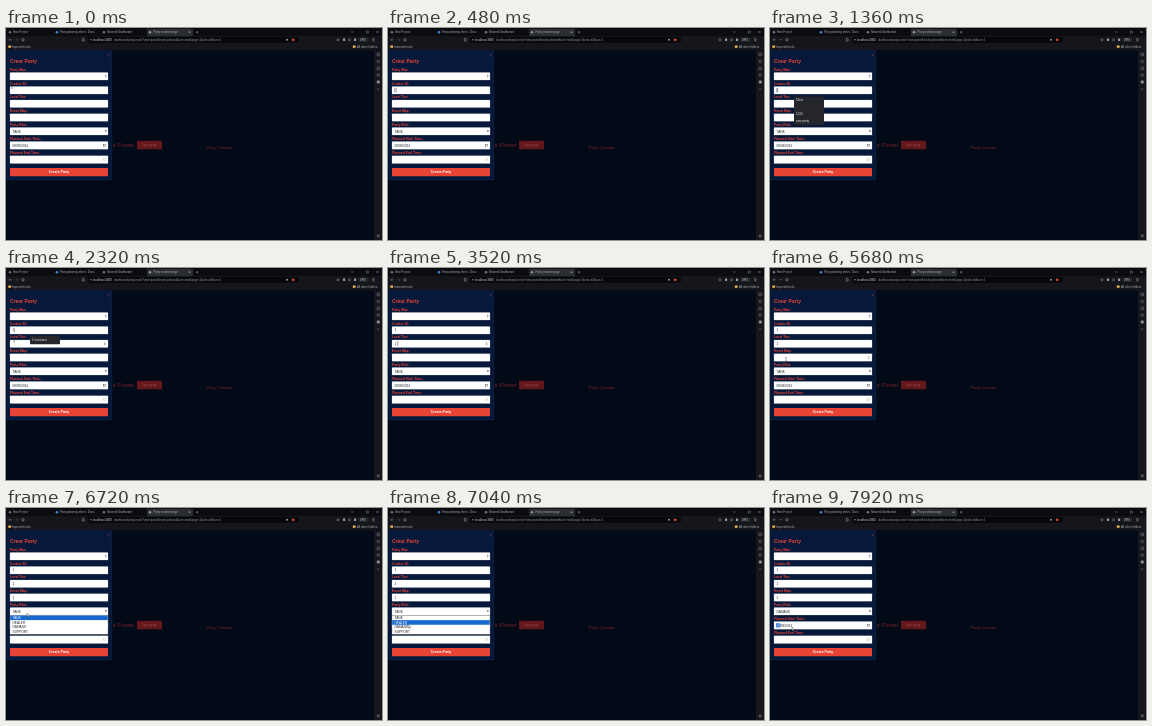
An HTML page for the animation above (8000 ms loop, 376 px wide and 212 px high).

```html
<!DOCTYPE html>
<html lang="en">
<head>
<meta charset="utf-8">
<title>Party form</title>
<style>
html, body { margin: 0; width: 100%; height: 100%; overflow: hidden; background: #020916; }
svg { display: block; width: 100vw; height: 100vh; }
text { font-family: "Liberation Sans", Arial, sans-serif; }
</style>
</head>
<body>
<svg id="stage" viewBox="0 0 376 212"></svg>
<script>
const LOOP = 8000;
const stage = document.getElementById('stage');

function add(tag, attrs, parent = stage) {
  const el = document.createElementNS('http://www.w3.org/2000/svg', tag);
  for (const k in attrs) el.setAttribute(k, attrs[k]);
  parent.appendChild(el);
  return el;
}
const group = () => add('g', {});
const box = (x, y, width, height, fill, rx = 0, p = stage) =>
  add('rect', { x, y, width, height, fill, rx }, p);
const dot = (cx, cy, r, fill, p = stage) => add('circle', { cx, cy, r, fill }, p);
const line = (d, stroke, w = 0.5, p = stage) =>
  add('path', { d, stroke, 'stroke-width': w, fill: 'none' }, p);
function label(x, y, str, size, fill, p = stage, weight = 400) {
  const el = add('text', { x, y, fill, 'font-size': size, 'font-weight': weight }, p);
  el.textContent = str;
  return el;
}
const cross = (x, y, r, color) =>
  line(`M${x - r} ${y - r}l${2 * r} ${2 * r}m0 ${-2 * r}l${-2 * r} ${2 * r}`, color);
const show = (el, on) => el.setAttribute('visibility', on ? 'visible' : 'hidden');

const RED = '#e94335', GREY = '#9a9ca2', INK = '#25272c', BLUE = '#1769cf';

function drawBrowser() {
  box(0, 0, 376, 22.5, '#0b0c10');
  box(0, 8, 376, 14.5, '#14161b');
  box(141, 0.8, 46, 7.2, '#2a2d34', 1);
  [[4, 7, 'New Project', '#70737b'], [51, 54, 'Party planning sheet - Docs', '#4b82d8'],
   [98, 101, 'Network Dashboard', '#70737b'], [144, 147.5, 'Party creation page', '#8f9299']]
    .forEach(([ix, x, str, color]) => {
      dot(ix, 4.2, 1.3, color);
      label(x, 5.3, str, 2.8, '#a7a9af');
    });
  cross(183.5, 4.2, 0.8, '#d0d1d5');
  line('M190 4.2h2.4m-1.2-1.2v2.4', GREY);
  line('M345 4h2.4', GREY);
  add('rect', { x: 360.5, y: 3, width: 2, height: 2, fill: 'none', stroke: GREY, 'stroke-width': 0.4 });
  cross(371.5, 4, 1, GREY);

  line('M6 11.8h-3m1.2-1.2l-1.2 1.2 1.2 1.2', '#85878d');
  line('M9 11.8h3m-1.2-1.2l1.2 1.2-1.2 1.2', '#55575d');
  add('circle', { cx: 17, cy: 11.8, r: 1.2, fill: 'none', stroke: '#b5b7bb', 'stroke-width': 0.5 });
  line('M76.3 10.3h1.8v3l-.9-.8-.9.8z', GREY);
  box(82, 9, 211, 5.7, '#07080b', 2);
  dot(85, 11.8, 0.8, '#8c8e94');
  label(87.2, 12.9, 'localhost:3000', 2.9, '#d7d8dc');
  label(108, 12.9, '/dashboard/party/create?view=panel&mode=planned&sort=start&page=1&role=all&size=5', 2.7, '#92949b');
  dot(281, 11.8, 1, '#93959d');
  dot(287.2, 11.8, 1.4, '#d94632');
  [332, 338, 343.5, 349].forEach((x, i) => i % 2
    ? box(x - 1, 10.6, 2.2, 2.4, '#9b9da3', 0.4)
    : add('circle', { cx: x, cy: 11.8, r: 1.1, fill: 'none', stroke: GREY, 'stroke-width': 0.5 }));
  box(352.8, 9.7, 9.8, 4.2, '#24262d', 1);
  label(354, 12.8, 'VPN', 2.7, '#c0c2c7');
  line('M366 10.7h2.7m-2.7 1.1h2.7m-2.7 1.1h2.7', '#b5b7bb', 0.4);

  box(2.3, 17.4, 2.8, 2.3, '#efbd54', 0.3);
  label(6.3, 19.6, 'Imported tools', 2.9, '#aaacb1');
  box(346.8, 17.4, 2.8, 2.3, '#efbd54', 0.3);
  label(351, 19.6, 'All other folders', 2.9, '#aaacb1');

  box(367.8, 22.5, 8.2, 189.5, '#15171d');
  [26.5, 33.5, 40.5, 47, 54, 61].forEach((y, i) => {
    if (i === 5) return line(`M371 ${y}h2.4`, '#85878c');
    add('rect', { x: 371, y: y - 1.2, width: 2.5, height: 2.4, rx: i % 2 ? 1.2 : 0.4,
      fill: i === 4 ? '#8b8d93' : 'none', stroke: '#92949a', 'stroke-width': 0.5 });
  });
  add('circle', { cx: 372.3, cy: 207.8, r: 1.1, fill: 'none', stroke: GREY, 'stroke-width': 0.6 });
}

function drawPage() {
  box(0, 22.5, 367.8, 189.5, '#020a18');
  label(106.5, 119.2, 'e Finder', 6, '#701f25');
  box(131, 112.8, 25, 8.4, '#65181c', 0.7);
  label(136, 118.1, 'Join party', 3.3, '#9c4b48');
  label(200.5, 120.7, 'Party Creador', 4.2, '#82222a');
}

const FIELDS = [
  ['Party Max:', 44.5], ['Creator ID:', 58.5], ['Level Tier:', 72], ['Event Map:', 85.7],
  ['Party Role:', 99.5], ['Planned Start Time:', 113.6], ['Planned End Time:', 127.8]
];

function drawForm() {
  box(0, 22.5, 106, 129.5, '#07193a');
  line('M0 22.7H105.8V151.8H0', '#132b52', 0.4);
  label(4, 35.1, 'Crear Party', 5, RED, stage, 700);
  cross(102.6, 27.3, 0.9, '#a34349');
  FIELDS.forEach(([name, y]) => {
    label(4, y - 1.8, name, 3.3, RED, stage, 700);
    add('rect', { x: 4, y, width: 98, height: 7.6, rx: 0.5, fill: '#fff',
      stroke: '#c9ccd2', 'stroke-width': 0.25 });
  });
  add('path', { d: 'M98.8 102.6h2.2l-1.1 1.4z', fill: INK });
  label(6.5, 118.6, '08/09/2024', 3.1, INK);
  [117.4, 131.6].forEach((y, i) => add('rect', { x: 97.2, y: y - 1, width: 2, height: 2,
    fill: 'none', stroke: i ? '#b4b6ba' : '#333', 'stroke-width': 0.4 }));
  box(4, 140, 98, 8.2, RED, 0.6);
  label(53, 145.3, 'Create Party', 3.5, '#fff', stage, 700).setAttribute('text-anchor', 'middle');
}

function spinner(x, y) {
  const g = group();
  add('path', { d: `M${x} ${y - 0.4}l.9-1.1.9 1.1zm0 .8l.9 1.1.9-1.1z`, fill: '#66696f' }, g);
  return g;
}

function popup(y, h, rows) {
  const g = group();
  box(24, y, 30, h, '#24262b', 0.7, g);
  rows.forEach(([dy, str]) => label(26, y + dy, str, 3, '#e4e5e8', g));
  return g;
}

drawBrowser();
drawPage();
drawForm();

const idText = label(6.5, 63.4, '1', 3.1, INK);
const tierText = label(6.5, 76.9, '1', 3.1, INK);
const mapText = label(6.5, 90.6, '1', 3.1, INK);
const roleText = label(6.5, 104.5, 'TANK', 3.2, INK);
const caret = box(6.1, 60, 0.35, 4, '#222');
spinner(98.8, 48.3);
const tierSpin = spinner(97.7, 75.8);
const mapSpin = spinner(97.7, 89.5);

const dateMark = group();
box(6, 115.4, 4.4, 4, BLUE, 0, dateMark);
label(6.5, 118.6, '08', 3.1, '#fff', dateMark);

const longList = popup(68.5, 28.5, [[4.8, 'Clear'], [18.5, '1234'], [25.2, 'new party']]);
const shortList = popup(67.7, 8.5, [[5.3, '1 manzana']]);

const ROLES = ['TANK', 'HEALER', 'DAMAGE', 'SUPPORT'];
const menu = group();
add('rect', { x: 4, y: 107.2, width: 98, height: 19, fill: '#fff', stroke: '#777', 'stroke-width': 0.35 }, menu);
const menuMark = box(4.2, 107.5, 97.6, 4.6, BLUE, 0, menu);
const options = ROLES.map((str, i) => label(6.5, 110.9 + i * 4.65, str, 3.2, INK, menu));

const arrow = add('path', { d: 'M0 0V3.5l.8-.7.6 1.2.6-.3-.6-1.2H2.5z',
  fill: '#fff', stroke: '#111', 'stroke-width': 0.35 });
const beam = line('M-.6-1.8h1.2M0-1.8V1.8M-.6 1.8h1.2', '#222', 0.4);

// time, x, y
const PATH = [
  [0, 6, 58.5], [450, 8, 62], [1650, 7.5, 62], [2250, 8, 71.8], [2700, 9.5, 75.5],
  [4250, 10, 75.6], [4950, 15, 89], [5500, 16, 91.3], [6000, 16, 91.3],
  [6500, 21, 104.5], [6800, 21, 105.2], [7120, 20, 118.5], [7320, 20, 118.5],
  [7600, 22, 119], [8000, 22, 119]
];

function pointer(t) {
  let i = 0;
  while (i < PATH.length - 2 && t >= PATH[i + 1][0]) i++;
  const [t0, x0, y0] = PATH[i], [t1, x1, y1] = PATH[i + 1];
  const u = (t - t0) / (t1 - t0), e = u * u * (3 - 2 * u);
  return [x0 + (x1 - x0) * e, y0 + (y1 - y0) * e];
}

function render(t) {
  const [x, y] = pointer(t);
  const within = i => y >= FIELDS[i][1] && y <= FIELDS[i][1] + 7.6;
  const opened = t >= 6560 && t < 7280;
  const typing = !opened && [1, 2, 3].some(within);
  show(arrow, !typing);
  show(beam, typing);
  [arrow, beam].forEach(el => el.setAttribute('transform', `translate(${x} ${y})`));

  show(longList, t >= 1040 && t < 1760);
  show(shortList, t >= 1760 && t < 2480);
  show(idText, t >= 1760);
  show(tierText, t >= 3280);
  show(mapText, t >= 5760);
  show(tierSpin, within(2));
  show(mapSpin, within(3));

  const active = t < 2640 ? 1 : t < 4960 ? 2 : 3;
  const filled = t >= [0, 1760, 3280, 5760][active];
  caret.setAttribute('x', filled ? 8.5 : 6.1);
  caret.setAttribute('y', FIELDS[active][1] + 1.8);
  show(caret, t >= 450 && t < 6400 && t % 1000 < 500);

  show(menu, opened);
  const pick = Math.max(0, Math.min(3, Math.floor((y - 107.4) / 4.65)));
  menuMark.setAttribute('y', 107.5 + pick * 4.65);
  options.forEach((el, i) => el.setAttribute('fill', i === pick ? '#fff' : INK));
  roleText.textContent = t < 7280 ? ROLES[0] : ROLES[2];
  show(dateMark, t >= 7600);
}

const start = performance.now();
function tick(now) {
  render(Math.max(0, now - start) % LOOP);
  requestAnimationFrame(tick);
}
render(0);
requestAnimationFrame(tick);
</script>
</body>
</html>
```
